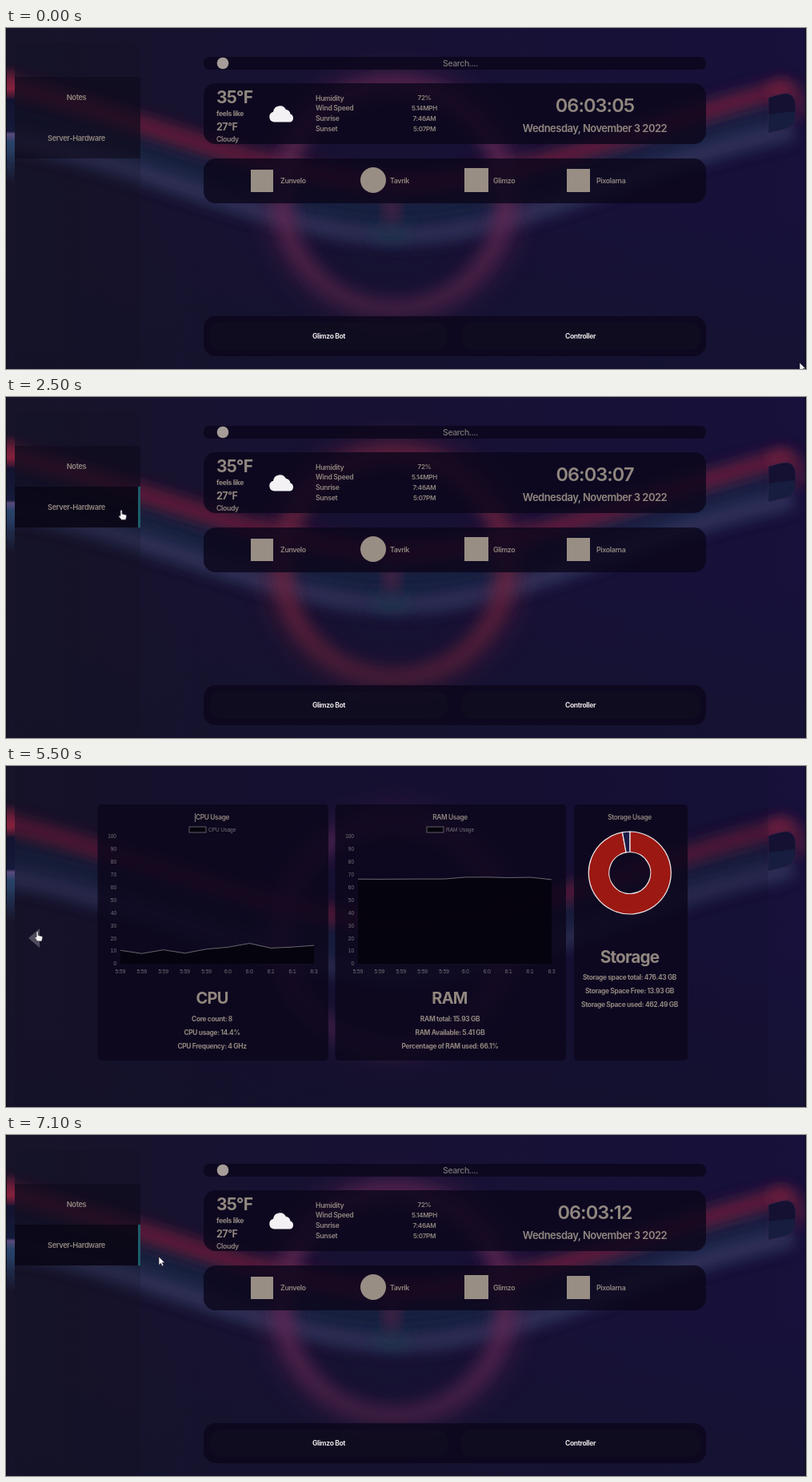
Animation, 1000 px wide and 426 px high, one loop 7.2 s. Source, as an HTML page:

```html
<!DOCTYPE html>
<html lang="en">
<head>
<meta charset="utf-8">
<title>Start page</title>
<style>
html, body { margin: 0; width: 100%; height: 100%; overflow: hidden; background: #161233; }
svg { display: block; width: 100%; height: 100%; }
text { font-family: Inter, sans-serif; font-weight: 600; letter-spacing: -.04em; fill: #91877f; }
text.tick { font-family: "Liberation Sans", Arial, sans-serif; font-weight: 400; letter-spacing: 0; fill: #77727a; }
.panel { fill: #0b071b; fill-opacity: .82; }
.icon { fill: #998e84; }
</style>
</head>
<body>
<svg id="stage" viewBox="0 0 1000 426">
  <defs>
    <linearGradient id="base">
      <stop offset="0" stop-color="#171429"/>
      <stop offset=".3" stop-color="#171231"/>
      <stop offset="1" stop-color="#17113b"/>
    </linearGradient>
    <linearGradient id="shade" x2="0" y2="1">
      <stop offset=".55" stop-color="#12132a" stop-opacity="0"/>
      <stop offset="1" stop-color="#12132a" stop-opacity=".5"/>
    </linearGradient>
    <linearGradient id="edge" x2="0" y2="1">
      <stop offset=".1" stop-color="#84203c" stop-opacity="0"/>
      <stop offset=".28" stop-color="#84203c"/>
      <stop offset=".34" stop-color="#3a1733"/>
      <stop offset=".36" stop-color="#12132f"/>
      <stop offset=".6" stop-color="#141a3a"/>
      <stop offset=".62" stop-color="#5a4a7c"/>
      <stop offset=".68" stop-color="#28436a"/>
      <stop offset="1" stop-color="#28436a" stop-opacity="0"/>
    </linearGradient>
    <filter id="soft" x="-30%" y="-60%" width="160%" height="220%"><feGaussianBlur stdDeviation="9"/></filter>
    <filter id="wide" x="-30%" y="-60%" width="160%" height="220%"><feGaussianBlur stdDeviation="16"/></filter>
    <clipPath id="screen"><rect width="1000" height="426"/></clipPath>
  </defs>
  <g clip-path="url(#screen)">
    <rect width="1000" height="426" fill="url(#base)"/>
    <g fill="none">
      <path d="M-40 105C180 138 330 228 485 228S790 138 965 108" stroke="#172c48" stroke-width="44" opacity=".7" filter="url(#wide)"/>
      <path d="M-40 132C180 162 330 257 485 260S790 165 985 128" stroke="#3d3c68" stroke-width="22" opacity=".7" filter="url(#soft)"/>
      <path d="M-40 62C180 112 330 190 485 194S790 122 980 74" stroke="#741f3b" stroke-width="22" opacity=".82" filter="url(#soft)"/>
      <g id="ring">
        <circle cx="485" cy="211" r="147" stroke-width="30" opacity=".42" filter="url(#wide)"/>
        <circle cx="485" cy="211" r="140" stroke-width="20" opacity=".75" filter="url(#soft)"/>
      </g>
      <path d="M953 78Q987 66 991 92V112" stroke="#82263f" stroke-width="11" opacity=".8" filter="url(#soft)"/>
    </g>
    <ellipse cx="482" cy="256" rx="24" ry="12" fill="#14404f" opacity=".5" filter="url(#soft)"/>
    <ellipse cx="482" cy="226" rx="10" ry="20" fill="#5c2146" opacity=".7" filter="url(#soft)"/>
    <rect width="1000" height="426" fill="url(#shade)"/>
    <rect y="30" width="11" height="165" fill="url(#edge)"/>
    <path d="M953 87Q972 81 978 82Q987 85 987 97V111Q986 124 970 127L953 131Z" fill="#141132" stroke="#49264f" stroke-opacity=".5"/>
    <path d="M953 108L986 104V111Q986 124 970 127L953 131Z" fill="#182344" opacity=".7"/>
    <g id="home"></g>
    <g id="hardware"></g>
    <g id="arrow"><path d="M0 0V10.5L2.5 8.3L4.2 11.8L6 11L4.4 7.6H7.6Z" fill="#f4f2f4" stroke="#181420" stroke-width=".6"/></g>
    <g id="hand"><path d="M-1 1Q0-1 1.2 1V5L6 6.2Q7 6.6 6.7 8.4L5.6 12.4H.2L-3 8.2Q-3.2 6.4-1 7.4Z" fill="#f4f2f4" stroke="#181420" stroke-width=".6"/></g>
    <path d="M.5 0V426M999.500 0V426" stroke="#0c0a16"/>
  </g>
</svg>
<script>
const LOOP = 7200, UPDATE = 3980;
const $ = id => document.getElementById(id);
const clamp = v => Math.min(1, Math.max(0, v));
const ramp = (t, from, to) => clamp((t - from) / (to - from));

// y is the middle of the capitals
const text = (x, y, size, str, attrs = '', anchor = 'middle') =>
  `<text x="${x}" y="${y + size * .36}" font-size="${size}" text-anchor="${anchor}" ${attrs}>${str}</text>`;
const left = (x, y, size, str, attrs) => text(x, y, size, str, attrs, 'start');
const box = (x, y, w, h, r, attrs = 'class="panel"') =>
  `<rect x="${x}" y="${y}" width="${w}" height="${h}" rx="${r}" ${attrs}/>`;
const bold = 'style="font-weight:700"';
const tick = 'class="tick"';

function buildHome() {
  const weather = [['Humidity', '72%'], ['Wind Speed', '5.14MPH'], ['Sunrise', '7:46AM'], ['Sunset', '5:07PM']];
  const icon = (x, y, s) => box(x, y, s, s, 0, 'class="icon"');
  const white = 'style="font-weight:700;fill:#e6e1e3"';
  const button = 'fill="#120e20" fill-opacity=".75"';
  $('home').innerHTML =
    box(11, 18, 157, 408, 14, 'fill="#10101e" fill-opacity=".2"') +
    box(11, 61, 157, 102, 0, 'fill="#0f0a1c" fill-opacity=".62"') +
    `<g id="lit">${box(11, 112, 157, 51, 0, 'fill="#090614" fill-opacity=".75"')}${box(165, 112, 3, 51, 0, 'fill="#1c5d69"')}</g>` +
    text(88, 87, 9.3, 'Notes') + text(88, 138, 9.3, 'Server-Hardware') +
    box(247, 36, 628, 16, 7) +
    '<circle cx="271" cy="44" r="7.3" fill="#a69c98"/>' +
    text(568, 44, 10.5, 'Search....', 'style="fill:#7c7478;font-weight:500"') +
    box(247, 69, 628, 76, 15) +
    left(263, 86, 21, '35°F', bold) + left(263, 106.5, 8.7, 'feels like', bold) +
    left(263, 123, 12.5, '27°F', bold) + left(263, 138.5, 8.7, 'Cloudy') +
    '<path d="M335 117.500A6.500 6.500 0 0 1 334 104.800A8.500 8.500 0 0 1 350 102A6.500 6.500 0 0 1 355.500 107.500A5.200 5.200 0 0 1 355 117.500Z" fill="#f3f1f3"/>' +
    weather.map(([k, v], i) => left(387, 87.5 + i * 12.8, 8.7, k) + text(523, 87.5 + i * 12.8, 8.1, v)).join('') +
    text(736, 96.5, 23.5, '', 'id="clock"') +
    text(736, 125, 13, 'Wednesday, November 3 2022') +
    box(247, 163, 628, 56, 15) +
    icon(306, 177, 28) + left(343, 190.5, 8.8, 'Zunvelo') +
    '<circle cx="459" cy="190" r="16" class="icon"/>' + left(480, 190.5, 8.8, 'Tavrik') +
    icon(573, 175, 30) + left(609, 190.5, 8.8, 'Glimzo') +
    icon(701, 176, 29) + left(738, 190.5, 8.8, 'Pixolarna') +
    box(436, 170.5, 113, 40, 20, 'id="pill" fill="#14141c" fill-opacity=".4" stroke="#2a2c58" stroke-opacity=".7"') +
    box(247, 360, 628, 50, 15) +
    box(255, 368, 297, 34, 14, button) + box(569, 368, 299, 34, 14, button) +
    text(403.5, 385, 8.5, 'Glimzo Bot', white) + text(718, 385, 8.5, 'Controller', white);
}

const CHARTS = [
  { id: 'cpu', x: 143, data: [10.5, 8, 10.9, 8.3, 11.5, 13, 16, 12.3, 13.1, 14.4] },
  { id: 'ram', x: 440, data: [66.5, 66.4, 66.5, 66.6, 66.6, 68, 68, 67.6, 67.9, 66.1] },
];
const LABELS = ['5:59', '5:59', '5:59', '5:59', '5:59', '6:0', '6:0', '6:1', '6:1', '6:3'];
const SPAN = 242;
const chartY = v => 247 - v * 1.59;

function donut(cx, cy, R, r, share) {
  const at = (rad, a) => `${cx + rad * Math.sin(a)} ${cy - rad * Math.cos(a)}`;
  const slice = (a, b, fill) => {
    const big = b - a > Math.PI ? 1 : 0;
    return `<path d="M${at(R, a)}A${R} ${R} 0 ${big} 1 ${at(R, b)}L${at(r, b)}A${r} ${r} 0 ${big} 0 ${at(r, a)}Z" fill="${fill}" stroke="#eeeaec" stroke-width="1.2"/>`;
  };
  const turn = Math.PI * 2;
  return slice(0, share * turn, '#9c1813') + slice(share * turn, turn, '#1b1c47');
}

function buildHardware() {
  const chart = ({ id, x }) => {
    const name = id.toUpperCase();
    let s = box(x - 28.5, 48, 288.5, 320, 5) +
      text(x + 115, 64.5, 8.3, name + ' Usage') +
      box(x + 86, 76, 21, 7, 0, 'fill="#05030c" stroke="#77727a" stroke-width=".8"') +
      left(x + 110, 79.5, 6.5, name + ' Usage', tick);
    for (let v = 0; v <= 100; v += 10) s += text(x - 5, chartY(v), 6.5, v, tick, 'end');
    return s + `<path id="${id}Fill" fill="#04030c" fill-opacity=".88"/><path id="${id}Line" fill="none" stroke="#827e86" stroke-width=".8"/><g id="${id}Labels"></g>` +
      text(x + 114.5, 290, 20, name, bold);
  };
  const lines = (x, y, prefix) => [0, 1, 2].map(i => text(x, y + i * 17, 8.4, '', `id="${prefix}${i}" ${bold}`)).join('');
  $('hardware').innerHTML =
    box(11, 0, 942, 426, 0, 'fill="#100d24" fill-opacity=".2"') +
    '<path d="M28 215L42 203V227Z" fill="#514c5d"/>' +
    CHARTS.map(chart).join('') +
    '<path d="M236.500 59V70" stroke="#a39a98" stroke-width=".8"/>' +
    lines(257.5, 315.5, 'cpuInfo') + lines(555, 315.5, 'ramInfo') +
    box(710, 48, 142, 320, 5) +
    text(779.5, 64.5, 8.3, 'Storage Usage') + donut(779.8, 133.5, 51.5, 26, .971) +
    text(779.5, 238.5, 20.8, 'Storage', bold) + lines(779.5, 264, 'diskInfo');
}

function drawHardware(t) {
  const added = t >= UPDATE;
  const ease = 1 - (1 - ramp(t, UPDATE, UPDATE + 1000)) ** 4;
  const n = added ? 10 : 9;
  for (const { id, x, data } of CHARTS) {
    const line = data.slice(0, n).map((v, i) => {
      if (i === 9) return [x + SPAN, chartY(v * ease)];
      const from = i / 8, to = i / 9;
      return [x + SPAN * (from + (to - from) * ease), chartY(v)];
    }).map(p => p.map(c => c.toFixed(2)).join(' ')).join('L');
    $(id + 'Line').setAttribute('d', 'M' + line);
    $(id + 'Fill').setAttribute('d', `M${x} 247L${line}L${x + SPAN} 247Z`);
    $(id + 'Labels').innerHTML = LABELS.slice(0, n).map((s, i) => text(x + SPAN * i / (n - 1), 257, 6.5, s, tick)).join('');
  }
  const pick = (a, b) => added ? b : a;
  const info = {
    cpuInfo: ['Core count: 8', `CPU usage: ${pick('13.1', '14.4')}%`, 'CPU Frequency: 4 GHz'],
    ramInfo: ['RAM total: 15.93 GB', `RAM Available: ${pick('5.12', '5.41')} GB`, `Percentage of RAM used: ${pick('67.9', '66.1')}%`],
    diskInfo: ['Storage space total: 476.43 GB', `Storage Space Free: ${pick('13.95', '13.93')} GB`, `Storage Space used: ${pick('462.48', '462.49')} GB`],
  };
  for (const key in info) info[key].forEach((s, i) => $(key + i).textContent = s);
}

// time, x, y of the pointer tip
const PATH = [
  [0, 992, 418], [300, 900, 375], [1000, 600, 230], [1300, 490, 190], [1500, 425, 185],
  [1900, 300, 165], [2300, 150, 143], [2500, 144, 141], [2700, 141, 140], [4700, 141, 140],
  [5300, 42, 205], [5700, 36, 208], [5900, 37, 160], [6300, 80, 143], [6800, 140, 142], [7100, 191, 152],
];
function pointer(t) {
  const i = PATH.findIndex(p => p[0] > t);
  if (i < 0) return PATH[PATH.length - 1].slice(1);
  const [a, b] = [PATH[i - 1], PATH[i]], k = ramp(t, a[0], b[0]);
  return [1, 2].map(j => a[j] + (b[j] - a[j]) * k);
}

function render(t) {
  const home = t < 2700 || t >= 5700;
  $('home').style.display = home ? '' : 'none';
  $('hardware').style.display = home ? 'none' : '';

  const mix = .5 - .5 * Math.cos((t - 2200) / LOOP * Math.PI * 2);
  const blend = (a, b) => Math.round(a + (b - a) * mix);
  $('ring').setAttribute('stroke', `rgb(${blend(112, 92)},${blend(34, 38)},${blend(62, 90)})`);

  const [x, y] = pointer(t);
  if (home) {
    $('clock').textContent = '06:03:' + String(5 + Math.floor((t + 300) / 1000)).padStart(2, '0');
    $('lit').setAttribute('opacity', t < 4000 ? ramp(t, 2200, 2400) : ramp(t, 5900, 6200));
    $('pill').setAttribute('opacity', ramp(t, 1050, 1250) * (1 - ramp(t, 1450, 1750)));
  } else drawHardware(t);

  const overLink = home
    ? (x > 11 && x < 168 && y > 61 && y < 163) || (x > 436 && x < 549 && y > 170 && y < 211)
    : x < 45 && y > 200;
  $('arrow').style.display = overLink ? 'none' : '';
  $('hand').style.display = overLink ? '' : 'none';
  for (const id of ['arrow', 'hand']) $(id).setAttribute('transform', `translate(${x} ${y})`);
}

buildHome();
buildHardware();
const start = performance.now();
let last = -1;
function frame(now) {
  const t = Math.floor(Math.max(0, now - start) % LOOP / 100) * 100;
  if (t !== last) render(last = t);
  requestAnimationFrame(frame);
}
render(0);
requestAnimationFrame(frame);
</script>
</body>
</html>
```
